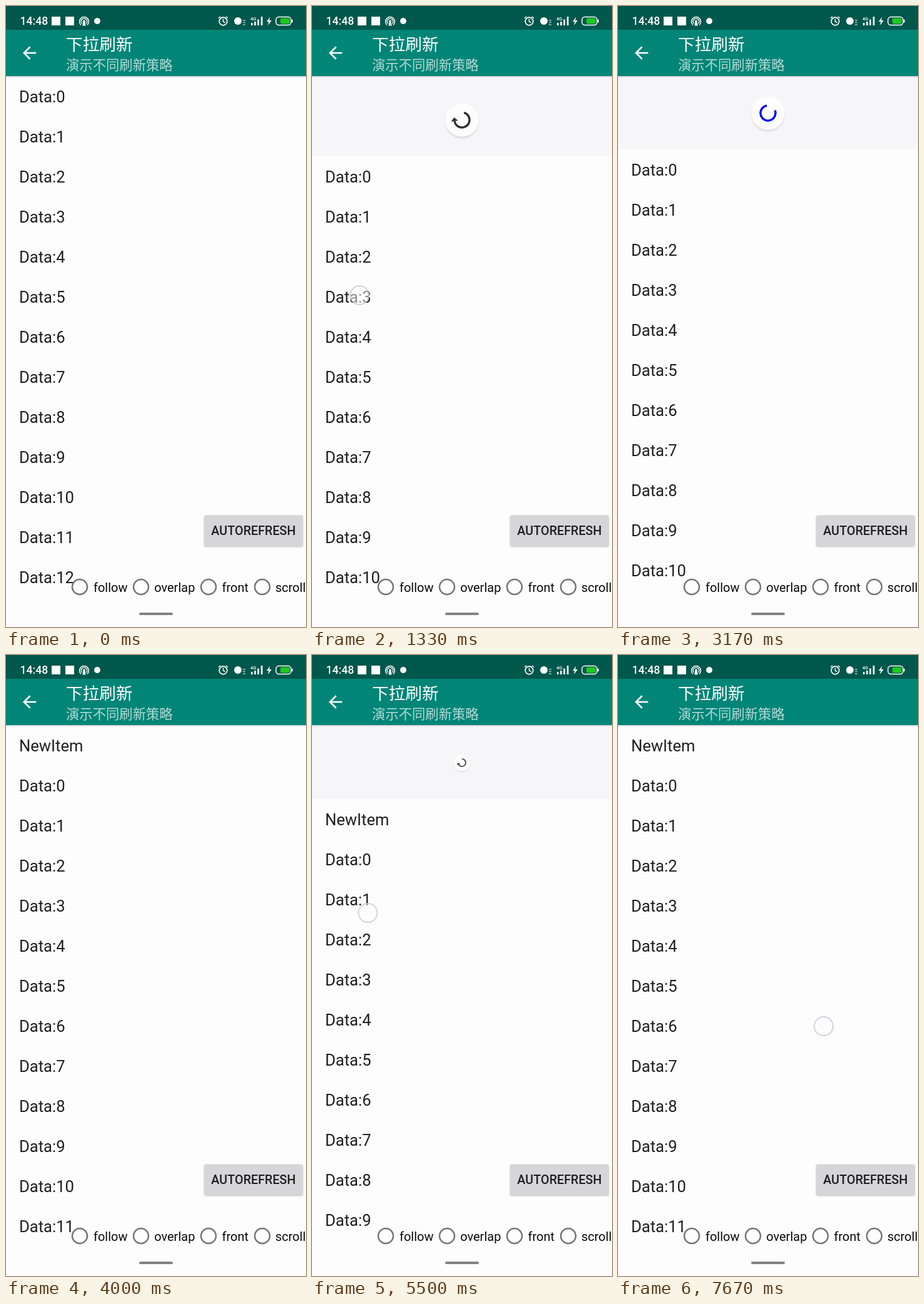
An HTML page that plays this animation: 480x992 px, repeating every 7.84 s.

```html
<!DOCTYPE html>
<html lang="zh">
<head>
<meta charset="utf-8">
<title>下拉刷新</title>
<style>
  html, body { margin: 0; width: 100%; height: 100%; overflow: hidden; background: #fdfdfd; }
  svg { display: block; width: 100%; height: 100%; }
  text { font-family: Roboto, "Noto Sans CJK SC", "Noto Sans CJK", sans-serif; }
  .row { font-size: 25.6px; fill: #1f1f1f; }
  .label { font-size: 20px; fill: #0a0a0a; }
  .cjk { font-family: "Noto Sans CJK SC", "Noto Sans CJK", sans-serif; fill: #fff; }
  .medium { font-weight: 500; }
</style>
</head>
<body>
<svg viewBox="0 0 480 992">
  <defs>
    <clipPath id="body"><rect y="112" width="480" height="834"/></clipPath>
    <linearGradient id="shade" x2="0" y2="1">
      <stop stop-color="#b8b8bc" stop-opacity=".6"/>
      <stop offset="1" stop-color="#e8e8ea" stop-opacity="0"/>
    </linearGradient>
    <filter id="soft" x="-30%" y="-30%" width="160%" height="160%"><feGaussianBlur stdDeviation="1.6"/></filter>
  </defs>

  <rect width="480" height="992" fill="#fdfdfd"/>
  <g clip-path="url(#body)">
    <rect id="zone" y="112" width="480" height="0" fill="#f6f6f9"/>
    <g id="list"></g>
    <g id="spinner">
      <circle cy="3" r="26.5" fill="#dcdce0" filter="url(#soft)"/>
      <circle r="26.7" fill="#fdfdfd"/>
      <g id="mark">
        <circle id="arc" r="12" pathLength="360" fill="none" stroke-width="3.3"/>
        <path id="tip" d="M6.4 0H17.6L12 6Z"/>
      </g>
    </g>
  </g>

  <rect y="112" width="480" height="4" fill="url(#shade)"/>
  <rect width="480" height="112" fill="#008577"/>
  <rect width="480" height="38" fill="#00574b"/>

  <g fill="#fff">
    <text class="medium" x="22.5" y="30" font-size="17.6">14:48</text>
    <rect x="73" y="17" width="14" height="14"/>
    <rect x="95" y="17" width="14" height="14"/>
    <circle cx="146" cy="24" r="5"/>
    <circle cx="371" cy="24" r="6"/>
    <circle cx="125" cy="24.5" r="2"/>
    <path d="M123.4 26h3.2l1 5.5h-5.2z"/>
    <g fill="none" stroke="#fff" stroke-width="1.5">
      <path d="M121.6 28A4.7 4.7 0 1 1 128.4 28M120 30.4A7.4 7.4 0 1 1 130 30.4"/>
      <circle cx="347.5" cy="24.5" r="6.3" stroke-width="1.7"/>
      <path d="M347.5 20.5v4.3l3 1.7M340 19.5l3.2-2.7M355 19.5l-3.2-2.7"/>
    </g>
    <path opacity=".55" d="M379 22h4v1.8h-4zM379 25.5h4v1.8h-4zM379 29h4v1.8h-4z"/>
    <path d="M392 27h2.6v4H392zM397.2 25h2.6v6h-2.6zM402.3 21.5h2.7v9.5h-2.7zM407.8 17h2.7v14h-2.7z"/>
    <text class="medium" x="391" y="23" font-size="7.5">4G</text>
    <path d="M422.5 17.5l-5.5 7.5h3.5l-1.5 6 6-8h-3.8z"/>
    <rect x="432" y="17.5" width="24" height="13" rx="4.5" fill="none" stroke="#fff" stroke-width="1.5"/>
    <rect x="457" y="21.5" width="1.8" height="5" rx=".9"/>
    <rect x="439" y="19.5" width="15" height="9" rx="2.5" fill="#1fc81f"/>
    <path transform="translate(21.6 59) scale(1.333)" d="M20 11H7.83l5.59-5.59L12 4l-8 8 8 8 1.41-1.41L7.83 13H20v-2z"/>
  </g>
  <text class="cjk medium" x="96" y="71" font-size="26.67">下拉刷新</text>
  <text class="cjk" x="96" y="101.5" font-size="21.33" opacity=".7">演示不同刷新策略</text>

  <rect x="317" y="815" width="158" height="49" rx="3" fill="#c4c4c6" filter="url(#soft)"/>
  <rect x="317" y="813.5" width="158" height="49" rx="3" fill="#d6d6d8"/>
  <text class="medium" x="396" y="845" font-size="19.8" text-anchor="middle" fill="#1f1f1f">AUTOREFRESH</text>

  <g id="radios"></g>
  <rect x="213" y="969" width="54" height="4" rx="2" fill="#828282"/>
  <circle id="touch" r="15" fill="#fdfdfd" fill-opacity=".5" stroke="#c4c4d4" stroke-opacity=".75" stroke-width="2"/>
</svg>

<script>
const LOOP = 7840, STEP = 1000 / 6;
const $ = id => document.getElementById(id);
const set = (el, attrs) => { for (const k in attrs) el.setAttribute(k, attrs[k]); return el; };
const add = (parent, tag, attrs, text = "") => {
  const el = set(document.createElementNS("http://www.w3.org/2000/svg", tag), attrs);
  el.textContent = text;
  return parent.appendChild(el);
};

const row = (text, i) => add($("list"), "text", { class: "row", x: 21, y: 154 + i * 64 }, text);
const newRow = row("NewItem", -1);
for (let i = 0; i < 14; i++) row("Data:" + i, i);

[["follow", 118, 140], ["overlap", 216, 237.2], ["front", 324, 345.5], ["scroll", 410, 431]].forEach(([name, cx, x]) => {
  add($("radios"), "circle", { cx, cy: 928, r: 12, fill: "none", stroke: "#757575", "stroke-width": 2.5 });
  add($("radios"), "text", { class: "label", x, y: 936 }, name);
});

// Keys are [step, value, ...]; one step is a sixth of a second.
const PULL = [[1, 0], [2, 6], [5, 56], [8, 128], [10, 160], [11, 124], [12, 117], [22, 117], [23, 40], [24, 0],
  [25, 12], [27, 95], [29, 133], [31, 142], [33, 118], [37, 46], [39, 8], [40, 0]];
const SIZE = [[22, 1], [23, 0], [24, 0], [25, 1], [32, 1], [34, 0]];
const TOUCHES = [
  [[1, 62, 244], [2, 62, 258], [5, 68, 344], [8, 76, 462], [9, 79, 505]],
  [[25, 80, 222], [27, 88, 345], [29, 93, 415], [31, 93, 428], [37, 82, 380], [40, 78, 348]],
  [[43, 320, 580], [46, 329, 593]]
];
const SPIN_FROM = 1670, SPIN_FULL = 2440, SPIN_END = 23, TURN = 1332;

function at(keys, k) {
  if (k <= keys[0][0]) return keys[0].slice(1);
  for (let i = 1; i < keys.length; i++) {
    const a = keys[i - 1], b = keys[i];
    if (k <= b[0]) {
      const p = (k - a[0]) / (b[0] - a[0]);
      return a.slice(1).map((v, j) => v + (b[j + 1] - v) * p);
    }
  }
  return keys[keys.length - 1].slice(1);
}

// cubic-bezier(.4, 0, .2, 1)
function ease(x) {
  let lo = 0, hi = 1, u = .5;
  for (let i = 0; i < 14; i++) {
    u = (lo + hi) / 2;
    const v = 1 - u;
    if (1.2 * v * v * u + .6 * v * u * u + u * u * u < x) lo = u; else hi = u;
  }
  return 3 * (1 - u) * u * u + u * u * u;
}

// Returns the end angle and the sweep of the progress arc in degrees.
function spinArc(t) {
  if (t < SPIN_FULL) {
    const p = Math.pow((t - SPIN_FROM) / (SPIN_FULL - SPIN_FROM), .62);
    return { end: 305 + 233 * p, sweep: 288 * (1 - p) + 4, color: "#000" };
  }
  const turns = (t - SPIN_FULL) / TURN, p = turns % 1;
  const base = 178 + Math.floor(turns) * 573 + 291.6 * p;
  const grow = p < .5 ? 284 * ease(p * 2) + 4 : 284 * (1 - ease(p * 2 - 1)) + 4;
  return { end: base + (p < .5 ? grow : 284), sweep: grow, color: "#00f" };
}

function draw(t) {
  const k = Math.floor((t + 4) / STEP), now = k * STEP;
  const [off] = at(PULL, k), [size] = at(SIZE, k);
  const spinning = k > 10 && k <= SPIN_END, fresh = k >= 22;

  set($("zone"), { height: off });
  set($("list"), { transform: `translate(0 ${off + (fresh ? 64 : 0)})` });
  newRow.style.display = fresh ? "" : "none";

  set($("spinner"), { transform: `translate(240 ${off + 54}) scale(${size})` });
  $("spinner").style.display = off > 0 && size > 0 ? "" : "none";
  const arc = spinning ? spinArc(now)
    : { end: 41 + (off - 56) * 1.8, sweep: 245 * Math.min(1, off / 117), color: "#000" };
  set($("arc"), {
    stroke: arc.color,
    "stroke-dasharray": `${arc.sweep} 720`,
    transform: `rotate(${arc.end - arc.sweep})`
  });
  set($("tip"), { transform: `rotate(${arc.end})` });
  $("tip").style.display = spinning ? "none" : "";
  set($("mark"), { opacity: spinning ? 1 : Math.min(.82, .3 + Math.max(0, off - 56) * .009) });

  const path = TOUCHES.find(p => k >= p[0][0] && k <= p[p.length - 1][0]);
  $("touch").style.display = path ? "" : "none";
  if (path) {
    const [cx, cy] = at(path, k);
    set($("touch"), { cx, cy });
  }
}

const begin = performance.now();
function tick() {
  draw((performance.now() - begin) % LOOP);
  requestAnimationFrame(tick);
}
tick();
</script>
</body>
</html>
```
